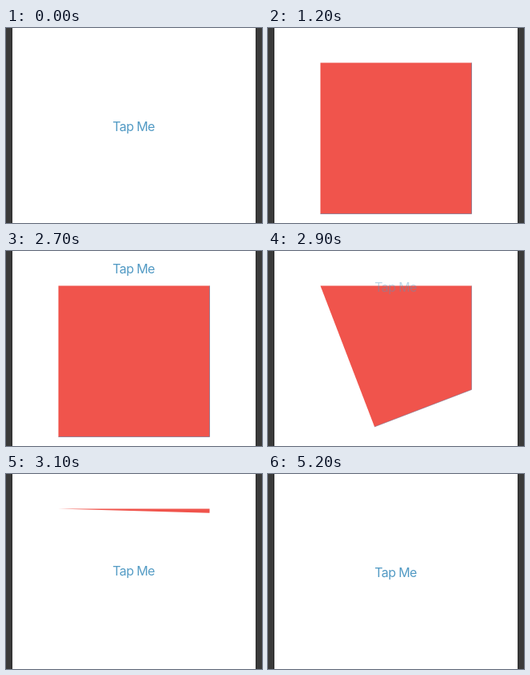
An HTML page with a canvas for the animation above (6000 ms loop, 320 px wide and 244 px high).

```html
<!DOCTYPE html>
<html lang="en">
<head>
<meta charset="utf-8">
<title>Pivot transition</title>
<style>
html, body { margin: 0; width: 100%; height: 100%; overflow: hidden; background: #fff; }
canvas { display: block; width: 320px; height: 244px; }
</style>
</head>
<body>
<canvas id="stage" width="320" height="244"></canvas>
<script>
const ctx = document.getElementById('stage').getContext('2d');
const LOOP = 6000, STEP = 100, DURATION = 350;
const OPEN = { start: 1094, shown: 1200 };
const CLOSE = { start: 2783, shown: 2800, end: 3200 };
const BOX = { x: 65.5, y: 43.5, size: 189 };
const LABEL = { x: 159.5, low: 128.5, high: 27.5 };

// cubic-bezier(.42, 0, .58, 1)
function easeInOut(x) {
  if (x <= 0) return 0;
  if (x >= 1) return 1;
  let lo = 0, hi = 1;
  for (let i = 0; i < 24; i++) {
    const s = (lo + hi) / 2, r = 1 - s;
    const bx = 1.26 * r * r * s + 1.74 * r * s * s + s * s * s;
    if (bx < x) lo = s; else hi = s;
  }
  return lo * lo * (3 - 2 * lo);
}

function drawSides() {
  ctx.fillStyle = '#3a3a3a';
  ctx.fillRect(0, 0, 8, 244);
  ctx.fillRect(312, 0, 8, 244);
  ctx.fillStyle = '#2c2c2c';
  ctx.fillRect(7, 0, 1, 244);
  ctx.fillRect(312, 0, 1, 244);
}

function drawLabel(y, alpha) {
  ctx.globalAlpha = alpha;
  ctx.fillStyle = '#529ac4';
  ctx.font = '16px Inter, Roboto, sans-serif';
  ctx.letterSpacing = '-0.6px';
  ctx.textAlign = 'center';
  ctx.fillText('Tap Me', LABEL.x, y);
  ctx.globalAlpha = 1;
}

// Square turned about its top left corner, clipped to its resting frame
function drawSquare(turn) {
  if (turn >= 1) return;
  const a = turn * Math.PI / 2;
  const { x, y, size } = BOX, right = x + size;
  const bx = x + size * Math.sin(a), by = y + size * Math.cos(a);
  const ry = by - (right - bx) * Math.tan(a);
  ctx.beginPath();
  ctx.moveTo(x, y);
  ctx.lineTo(right, y);
  ctx.lineTo(right, ry);
  ctx.lineTo(bx, by);
  ctx.closePath();
  ctx.fillStyle = '#f0544c';
  ctx.fill();

  ctx.globalAlpha = 0.75 * (1 - turn);
  ctx.strokeStyle = '#78738f';
  ctx.lineWidth = 1;
  ctx.beginPath();
  ctx.moveTo(right, y);
  ctx.lineTo(right, ry);
  ctx.lineTo(bx, by);
  ctx.stroke();
  ctx.globalAlpha = 1;
}

function draw(t) {
  ctx.fillStyle = '#fff';
  ctx.fillRect(0, 0, 320, 244);
  const travel = LABEL.low - LABEL.high;
  if (t < OPEN.shown || t >= CLOSE.end) {
    drawLabel(LABEL.low, 1);
  } else if (t < CLOSE.shown) {
    const p = easeInOut((t - OPEN.start) / DURATION);
    drawLabel(LABEL.low - travel * p, 0.2 + 0.8 * p);
    drawSquare(0);
  } else {
    const p = easeInOut((t - CLOSE.start) / DURATION);
    drawSquare(p);
    drawLabel(LABEL.high + travel * p, 0.2 + 0.8 * p);
  }
  drawSides();
}

const origin = performance.now();
function tick() {
  const t = (performance.now() - origin) % LOOP;
  draw(Math.floor(t / STEP) * STEP);
  requestAnimationFrame(tick);
}
tick();
</script>
</body>
</html>
```
